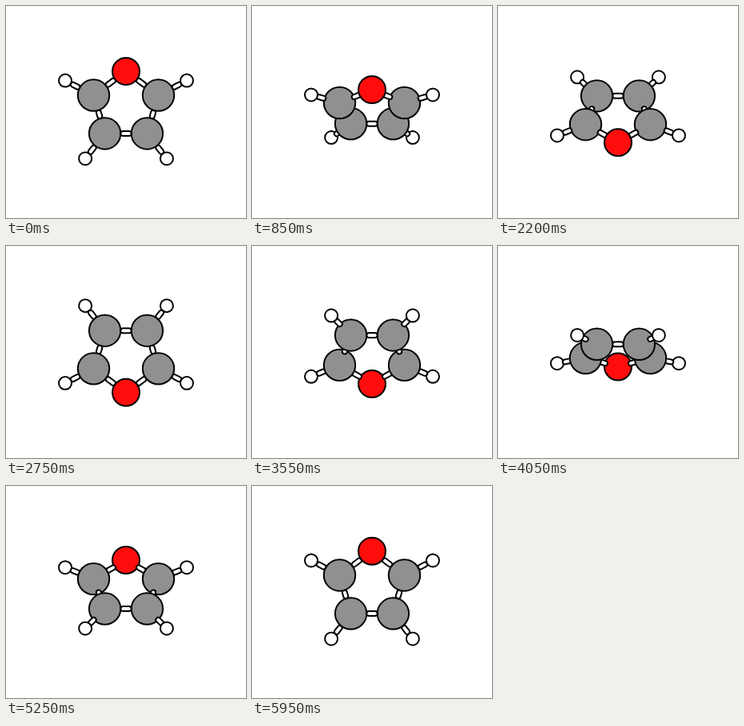
An HTML page with a canvas that plays this animation: 300 by 266 pixels, repeating every 6000 ms.

```html
<!DOCTYPE html>
<html lang="en">
<head>
<meta charset="utf-8">
<title>Turning ring molecule</title>
<style>
html, body { margin: 0; width: 100%; height: 100%; overflow: hidden; background: #fff; }
canvas { display: block; }
</style>
</head>
<body>
<canvas id="stage" width="300" height="266"></canvas>
<script>
const ctx = document.getElementById('stage').getContext('2d');
const CX = 150, CY = 133, STEP = 50, LOOP = 6000;
const CAP = 3; // distance from an atom's surface to the centre of a bond's round end

const oxygen = { r: 17, fill: '#ff0d0d' };
const carbon = { r: 19.7, fill: '#909090' };
const hydrogen = { r: 8, fill: '#fff' };

// A flat molecule: positions are relative to the centre of the stage.
const atom = (kind, x, y) => ({ ...kind, x, y });
const atoms = [
  atom(oxygen, 0, -51.4),
  atom(carbon, -40.5, -21.1), atom(carbon, 40.5, -21.1),
  atom(carbon, -26.4, 27.1), atom(carbon, 26.4, 27.1),
  atom(hydrogen, -76, -39.6), atom(hydrogen, 76, -39.6),
  atom(hydrogen, -50.9, 58.8), atom(hydrogen, 50.9, 58.8)
];

const bonds = [[0, 1], [0, 2], [1, 3], [2, 4], [3, 4], [1, 5], [2, 6], [3, 7], [4, 8]].map(([i, j]) => {
  const a = atoms[i], b = atoms[j];
  const dx = b.x - a.x, dy = b.y - a.y, len = Math.hypot(dx, dy);
  const along = d => ({ x: a.x + dx * d / len, y: a.y + dy * d / len });
  return {
    y: (a.y + b.y) / 2,
    from: along(a.r + CAP),
    to: along(len - b.r - CAP)
  };
});

const parts = [...atoms, ...bonds];

function drawAtom(a, squash) {
  ctx.beginPath();
  ctx.arc(CX + a.x, CY + a.y * squash, a.r, 0, 2 * Math.PI);
  ctx.fillStyle = a.fill;
  ctx.fill();
  ctx.lineWidth = 2;
  ctx.strokeStyle = '#000';
  ctx.stroke();
}

function drawBond({ from, to }, squash) {
  ctx.beginPath();
  ctx.moveTo(CX + from.x, CY + from.y * squash);
  ctx.lineTo(CX + to.x, CY + to.y * squash);
  for (const [width, color] of [[8, '#000'], [4, '#fff']]) {
    ctx.lineWidth = width;
    ctx.strokeStyle = color;
    ctx.stroke();
  }
}

function draw(time) {
  const step = Math.floor((time % LOOP) / STEP);
  const angle = (step * 3 + 6) * Math.PI / 180;
  const squash = Math.cos(angle), tilt = Math.sin(angle);

  ctx.fillStyle = '#fff';
  ctx.fillRect(0, 0, 300, 266);
  ctx.lineCap = 'round';

  // Far parts first; at equal depth bonds stay above atoms.
  const ordered = [...parts].sort((p, q) => (q.y - p.y) * tilt);
  for (const p of ordered) (p.from ? drawBond : drawAtom)(p, squash);
}

const start = performance.now();
function tick() {
  draw(performance.now() - start);
  requestAnimationFrame(tick);
}
tick();
</script>
</body>
</html>
```
